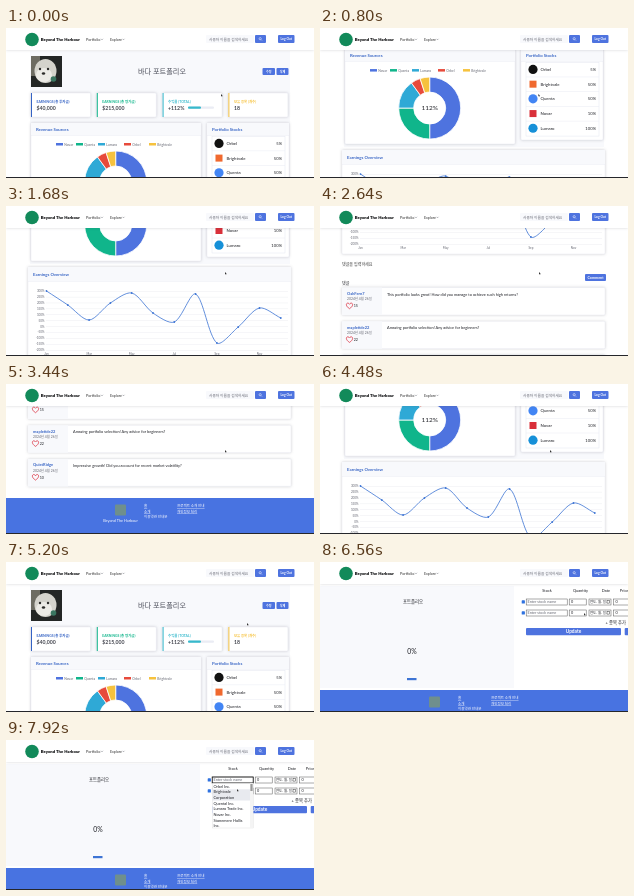
An HTML page for the animation above (8000 ms loop, 308x150 px).

```html
<!DOCTYPE html>
<html lang="ko">
<head>
<meta charset="utf-8">
<style>
html, body { margin: 0; height: 100%; overflow: hidden; background: #fff; }
svg { display: block; width: 100vw; height: 100vh; font-family: Lato, "Noto Sans CJK KR", "Noto Sans CJK", sans-serif; }
.card { filter: drop-shadow(0 .5px 1.6px #3a3b4538); }
</style>
</head>
<body>
<svg id="stage" viewBox="0 0 308 150"></svg>
<script>
const BLUE = '#4e73df', DARK_BLUE = '#2e59d9', TITLE = '#3563c4', GRAY = '#666873', INK = '#1f2026', PALE = '#f8f9fc', LINE = '#e3e6f0';
const GREEN = '#10b58b', CYAN = '#2fa9d6', RED = '#e74a3b', YELLOW = '#f6c23e';
const SITE = 'Beyond The Harbour';

const rect = (x, y, w, h, fill, more = '') => `<rect x="${x}" y="${y}" width="${w}" height="${h}" fill="${fill}" ${more}/>`;
const circle = (x, y, r, fill) => `<circle cx="${x}" cy="${y}" r="${r}" fill="${fill}"/>`;
const ellipse = (x, y, rx, ry, fill) => `<ellipse cx="${x}" cy="${y}" rx="${rx}" ry="${ry}" fill="${fill}"/>`;
const path = (d, stroke, width, fill = 'none') => `<path d="${d}" stroke="${stroke}" stroke-width="${width}" fill="${fill}"/>`;
const text = (x, y, s, size, fill = INK, weight = 400, anchor = 'start', more = '') =>
  `<text x="${x}" y="${y}" font-size="${size}" fill="${fill}" font-weight="${weight}" text-anchor="${anchor}" ${more}>${s}</text>`;
const group = (id, body) => `<g id="${id}">${body}</g>`;
const card = (x, y, w, h) => rect(x, y, w, h, '#fff', `rx="1" stroke="${LINE}" stroke-width=".4" class="card"`);
const panel = (x, y, w, h, head, title) => card(x, y, w, h) + rect(x, y, w, head, PALE) +
  rect(x, y + head, w, .4, LINE) + text(x + 5, y + head / 2 + 1.6, title, 4.3, TITLE, 700);
const button = (x, y, w, h, label, size, id = '') => rect(x, y, w, h, BLUE, `rx="1" id="${id}"`) +
  text(x + w / 2, y + h / 2 + size * .36, label, size, '#fff', 700, 'middle');

function nav() {
  const chevron = x => path(`M${x} 10.8l1 1 1-1`, GRAY, .5);
  return rect(0, 0, 308, 22, '#fff', 'class="card"') + circle(26, 11.5, 6.8, '#128a5a') +
    text(34.8, 13, SITE, 4.2, '#08090b', 900) +
    text(80, 13, 'Portfolio', 3.8, '#333') + chevron(95) +
    text(104, 13, 'Explore', 3.6, '#333') + chevron(116.5) +
    rect(200, 7, 48, 8, PALE, 'rx="1"') + text(203, 12.6, '사용자 이름을 검색하세요', 3.7, GRAY) +
    button(249, 7, 11, 8, '', 3) + '<circle cx="254.2" cy="10.7" r="1.1" fill="none" stroke="#fff" stroke-width=".5"/>' +
    path('M255 11.5l1 1', '#fff', .5) + button(272, 7, 16.5, 8, 'Log Out', 3.2);
}

function profile() {
  return rect(25, 28, 31, 31, '#232625') + rect(25, 28, 9, 20, '#6d6c62') +
    ellipse(39.5, 43, 11, 12, '#d4d3cc') + ellipse(38, 47, 8, 7, '#ecebe6') +
    circle(34, 41, 1.2, '#2a2a28') + circle(42, 41, 1.2, '#2a2a28') + ellipse(37.5, 45.5, 1.7, 1.2, '#2a2a28') +
    circle(47.5, 51, 2.8, '#3a7560') +
    text(156, 46, '바다 포트폴리오', 7.2, '#4d4f5b', 400, 'middle') +
    button(256.5, 40, 12.5, 7, '수정', 3, 'edit') + button(270.5, 40, 12, 7, '삭제', 3);
}

function stats() {
  return [
    ['EARNINGS (총 투자금)', '$40,000', TITLE],
    ['EARNINGS (총 평가금)', '$215,000', GREEN],
    ['수익률 (TOTAL)', '+112%', '#36b9cc'],
    ['보유 종목 (개수)', '18', YELLOW]
  ].map(([label, value, color], i) => {
    const x = 25 + i * 65.8;
    return card(x, 65, 59.5, 24) + rect(x, 65, 1, 24, color) +
      text(x + 5.5, 74.6, label, 3.4, color, 700) + text(x + 5.5, 81.6, value, 5.2, '#44464f', 700);
  }).join('') + rect(182, 78.5, 26, 2.2, '#eaecf4', 'rx="1"') + rect(182, 78.5, 13, 2.2, '#36b9cc', 'rx="1"');
}

function donut(cx, cy, R, r) {
  const at = (a, q) => `${cx + q * Math.sin(a)} ${cy - q * Math.cos(a)}`;
  let start = 0;
  return [[.5, BLUE], [.25, GREEN], [.15, CYAN], [.05, RED], [.05, YELLOW]].map(([share, color]) => {
    const a = start * 2 * Math.PI, b = (start += share) * 2 * Math.PI;
    return path(`M${at(a, R)}A${R} ${R} 0 0 1 ${at(b, R)}L${at(b, r)}A${r} ${r} 0 0 0 ${at(a, r)}Z`, '#fff', .8, color);
  }).join('') + text(cx, cy + 2.3, '112%', 6.5, INK, 400, 'middle');
}

function sources() {
  const legend = [[50, 'Novar', BLUE], [70, 'Quenta', GREEN], [92, 'Lumaro', CYAN], [118, 'Orbel', RED], [143, 'Brightvale', YELLOW]];
  return panel(25, 95, 170, 95, 12, 'Revenue Sources') +
    legend.map(([x, name, color]) => rect(x, 115, 7, 2.5, color) + text(x + 8.3, 117.6, name, 3.3, GRAY)).join('') +
    donut(109.7, 154, 31, 16);
}

function stocks() {
  const square = (y, color) => rect(209.5, y - 3.5, 7, 7, color);
  const dot = (y, color) => circle(213, y, 4.6, color);
  return panel(201, 95, 82, 91, 12, 'Portfolio Stocks') +
    rect(206, 108.5, 73, 73.5, 'none', `stroke="${LINE}" stroke-width=".5"`) +
    [['Orbel', '5%', dot, '#111'], ['Brightvale', '50%', square, '#f0692f'], ['Quenta', '50%', dot, '#4285f4'],
     ['Novar', '10%', square, '#d9303a'], ['Lumaro', '100%', dot, '#1690d8']].map(([name, share, mark, color], i) => {
      const y = 115.4 + i * 14.7;
      return mark(y, color) + text(220.5, y + 1.5, name, 4.3, INK) + text(276, y + 1.5, share, 4.2, INK, 400, 'end') +
        (i < 4 ? rect(206, y + 7.3, 73, .4, LINE) : '');
    }).join('');
}

function curve(points, tension = .3) {
  // Cubic controls follow the chord between both neighbours.
  const controls = points.map((p, i) => {
    const a = points[i - 1] || p, b = points[i + 1] || p;
    const before = Math.hypot(p[0] - a[0], p[1] - a[1]), after = Math.hypot(b[0] - p[0], b[1] - p[1]);
    const k = tension / (before + after), dx = b[0] - a[0], dy = b[1] - a[1];
    return [p[0] - dx * k * before, p[1] - dy * k * before, p[0] + dx * k * after, p[1] + dy * k * after];
  });
  return 'M' + points[0] + points.slice(1).map((p, i) =>
    `C${controls[i].slice(2)} ${controls[i + 1].slice(0, 2)} ${p}`).join('');
}

function overview() {
  const points = [85, 99, 114, 97, 87, 107, 116, 88, 137, 121, 102, 112].map((y, i) => [40.5 + i * 21.3, y + 135]);
  let out = panel(22, 196, 263, 93, 14, 'Earnings Overview');
  for (let i = 0; i < 11; i++) {
    const y = 220 + i * 5.9;
    out += rect(40, y, 242, .35, '#e4e6ec') + text(38.5, y + 1.1, `${300 - i * 50}%`, 3, GRAY, 400, 'end');
  }
  ['Jan', 'Mar', 'May', 'Jul', 'Sep', 'Nov'].forEach((m, i) => out += text(40.5 + i * 42.6, 284, m, 3, GRAY, 400, 'middle'));
  return out + path(curve(points), '#3d74d4', .8) + points.map(p => circle(...p, .9, '#3d74d4')).join('');
}

function comments() {
  return text(22, 300.5, '댓글을 입력하세요', 4, '#333') + button(265, 309, 21, 7, 'Comment', 3.7) + text(22, 320, '댓글', 4) +
    [['OakFern7', 15, 'This portfolio looks great! How did you manage to achieve such high returns?'],
     ['mapletide22', 22, 'Amazing portfolio selection! Any advice for beginners?'],
     ['QuietRidge', 10, 'Impressive growth! Did you account for recent market volatility?']].map(([name, likes, line], i) => {
      const y = 322.5 + i * 33.7;
      return card(22, y, 263, 27.5) + rect(22, y, 40, 27.5, PALE) + text(27, y + 7.3, name, 4, TITLE, 700) +
        text(27, y + 12.6, '2024년 4월 26일', 3.4, GRAY) +
        path(`M29.5 ${y + 21.2}c-6-4-1.8-7.5 0-4.4c1.8-3.1 6 .4 0 4.4z`, '#dc3545', .8) +
        text(33.7, y + 19.6, likes, 3.7) + text(67, y + 8.2, line, 3.9);
    }).join('');
}

function footer(y) {
  const link = (x, dy, s, u = '') => text(x, y + dy, s, 3.5, '#fff', 400, 'start', u);
  const under = 'text-decoration="underline"';
  return rect(0, y, 308, 38, '#4873e1') + rect(109, y + 6.5, 11, 11, '#6f8f8c', 'rx="1"') +
    text(114.5, y + 24.3, SITE, 3.8, '#fff', 400, 'middle') +
    link(138, 9, '홈', under) + link(138, 14.6, '소개', under) + link(138, 20.2, '이용약관 안내문') +
    link(171, 9, '프로젝트 소개 안내', under) + link(171, 14.6, '개인정보 처리', under);
}

function form() {
  const field = (x, y, w) => rect(x, y, w, 6, '#fff', 'stroke="#555" stroke-width=".5"');
  const heading = (x, s) => text(x, 30, s, 3.9, INK, 400, 'middle');
  const row = y => rect(201.7, y + 1.3, 3.2, 3.2, '#2f72e0', 'rx=".6"') + field(206.2, y, 41) +
    text(207.5, y + 4.3, 'Enter stock name', 3.8, GRAY) +
    field(249.2, y, 17) + text(251, y + 4.4, '0', 3.8) +
    field(269, y, 22) + text(270, y + 4.3, '연도. 월. 일.', 3.4) + rect(287, y + 1.7, 2.4, 2.4, 'none', 'stroke="#333" stroke-width=".5"') +
    field(293.5, y, 18) + text(295.5, y + 4.4, '0', 3.8);
  return rect(0, 24, 194, 102, PALE) + text(93, 41.2, '포트폴리오', 4.4, INK, 400, 'middle') +
    text(92, 92, '0%', 6.8, INK, 400, 'middle') + rect(87, 116, 9.5, 2.2, '#3d74d4') +
    heading(227, 'Stock') + heading(260.5, 'Quantity') + heading(286, 'Date') + heading(304, 'Price') +
    row(37) + row(48) + text(306, 62, '+ 종목 추가', 4.3, INK, 400, 'end') +
    button(206, 66, 95, 7.3, 'Update', 4.8, 'update') + button(304.7, 66, 20, 7.3, '', 4) + footer(128);
}

function menu() {
  const names = ['Orbel Inc.', 'Brightvale', 'Corporation', 'Quental Inc.', 'Lumaro Trade Inc.', 'Novar Inc.', 'Stonemere Hollis', 'Inc.'];
  return rect(206.2, 37, 41, 6, 'none', 'stroke="#222" stroke-width=".8"') +
    rect(206.2, 43.3, 41, 44.7, '#fff', 'stroke="#ccc" stroke-width=".3"') + rect(206.4, 43.6, 37.6, 5.6, '#e8eaef', 'id="mark"') +
    names.map((s, i) => text(207.5, 47.8 + i * 5.65, s, 3.9)).join('') +
    rect(244, 43.4, 3, 44.4, '#f4f4f4') + rect(244.4, 44, 2.2, 7, '#999');
}

const stage = document.getElementById('stage');
stage.innerHTML = group('page', rect(24, 23, 260, 170, PALE) + profile() + stats() + sources() + stocks() +
    overview() + comments() + footer(429)) +
  group('editor', form() + group('menu', menu())) + nav() +
  rect(0, 149, 308, 1, '#25262b') +
  group('cursor', path('M0 0v2.4l.6-.5.4.8.4-.2-.4-.8h.8z', '#fff', .15, '#111'));
const el = id => document.getElementById(id);

const SCROLL = [[80, 0], [1200, 115], [1360, 115], [1680, 135], [2640, 241], [2720, 241], [3440, 315], [3520, 315], [4480, 118], [5200, 0]];
const POINTER = [[0, 215, 66], [960, 219, 66], [3520, 219, 66], [4480, 230, 66], [5200, 241, 61], [5520, 262, 45],
  [6480, 262, 45], [6800, 270, 69], [6960, 262, 70], [7360, 228, 47], [7600, 229, 40], [7760, 229, 45], [7920, 231, 49]];

function track(keys, t) {
  const i = keys.findIndex(k => k[0] > t);
  if (i < 0) return keys.at(-1).slice(1);
  if (!i) return keys[0].slice(1);
  const a = keys[i - 1], b = keys[i], p = (t - a[0]) / (b[0] - a[0]);
  return a.slice(1).map((v, j) => v + (b[j + 1] - v) * p);
}
const show = (id, on) => el(id).style.display = on ? '' : 'none';

function draw(now) {
  const t = Math.floor(now % 8000 / 80) * 80;
  const [x, y] = track(POINTER, t);
  const editing = t >= 5680;
  show('page', !editing);
  show('editor', editing);
  show('menu', t >= 7520);
  el('page').setAttribute('transform', `translate(0 ${-track(SCROLL, t)[0]})`);
  el('cursor').setAttribute('transform', `translate(${x} ${y})`);
  el('edit').setAttribute('fill', t >= 5440 ? DARK_BLUE : BLUE);
  el('update').setAttribute('fill', y > 66 && y < 73 ? DARK_BLUE : BLUE);
  el('mark').setAttribute('y', t >= 7840 ? 49.3 : 43.6);
  el('mark').setAttribute('height', t >= 7840 ? 11.2 : 5.6);
  requestAnimationFrame(draw);
}
requestAnimationFrame(draw);
</script>
</body>
</html>
```
